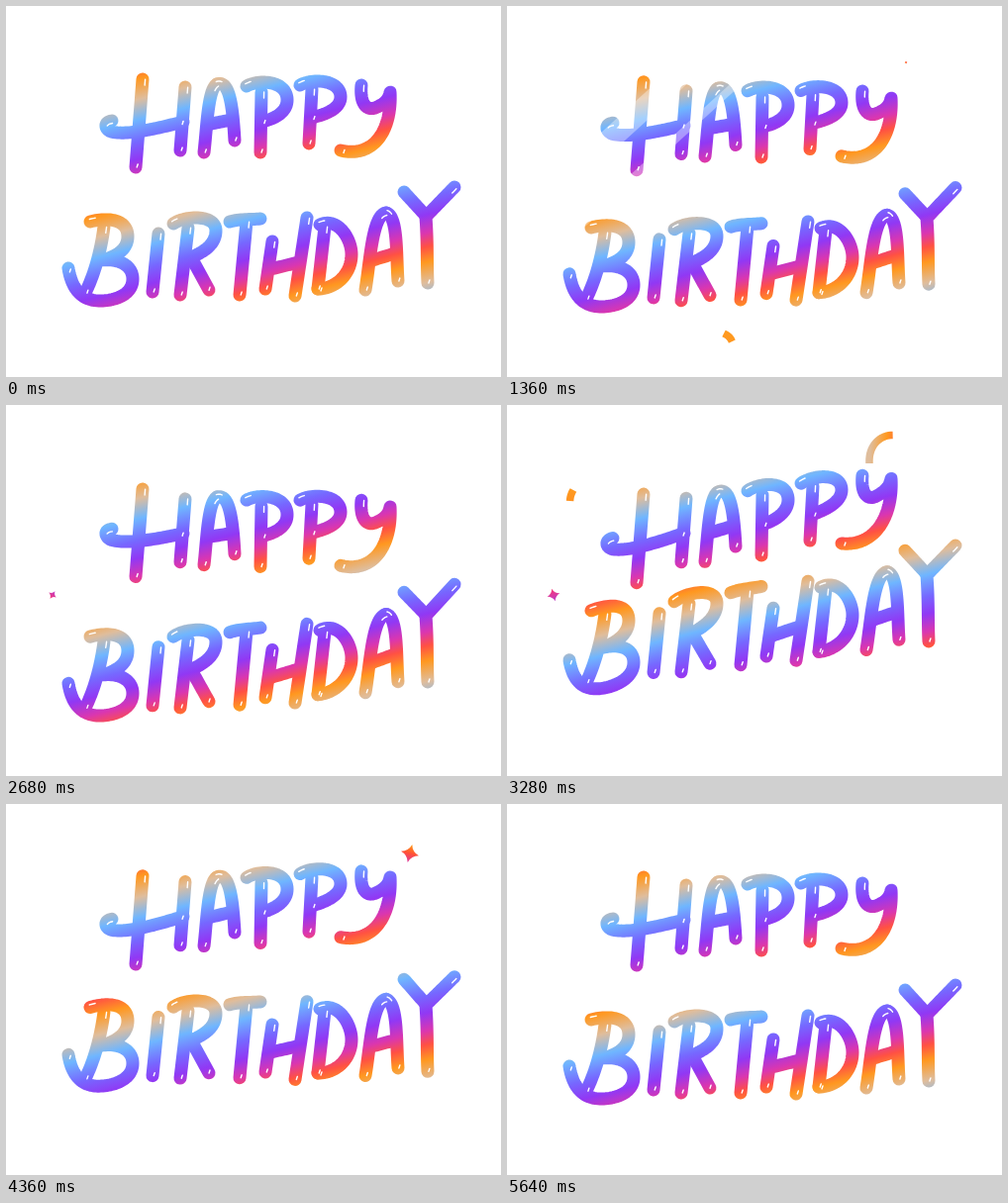
Recreate the animation shown at these times as an HTML page with a canvas. Size 500x375 px, loop 5.68 s.

```html
<!DOCTYPE html>
<html lang="en">
<head>
<meta charset="utf-8">
<title>Happy Birthday</title>
<style>
html, body { margin: 0; width: 100%; height: 100%; overflow: hidden; background: #fff; }
canvas { display: block; width: 500px; height: 375px; }
</style>
</head>
<body>
<canvas width="500" height="375" role="img" aria-label="Happy Birthday"></canvas>
<script>
const LOOP = 5680, STEP = 40, WAVE = 1410, SWING = 21, SKEW = 3, TAU = Math.PI * 2;
const ctx = document.querySelector('canvas').getContext('2d');

// Lettering at time zero: one path per pen stroke.
const happy = [
  'M138 74L131 163', 'M181 82L176 146',
  'M107 116C99 117 99 124 106 127C122 131 152 124 179 117',
  'M213 79C204 84 203 122 200 148', 'M213 79C226 74 229 102 231 136', 'M207 119L228 115',
  'M243 81C255 74 284 75 284 95C284 109 268 115 258 117', 'M258 87L257 148',
  'M297 80C309 73 338 74 338 92C338 104 322 110 308 113', 'M309 84L306 139',
  'M359 80C357 101 366 107 375 102C384 98 387 93 388 87C390 125 372 154 338 146'
];
const birthday = [
  'M85 218C100 214 123 214 123 233C123 248 108 254 97 257C112 255 128 261 128 276C128 292 110 298 95 298C75 298 66 284 63 265',
  'M99 223C96 246 90 270 80 290',
  'M154 230L148 289',
  'M169 220C180 212 212 210 212 227C212 243 196 250 187 254L205 287', 'M184 224L176 292',
  'M226 218C236 215 247 216 257 215', 'M243 218L236 292',
  'M269 238L262 286', 'M304 214L292 293', 'M267 266L296 259',
  'M317 221C335 213 349 235 349 251C349 272 332 286 315 286', 'M322 223L315 286',
  'M384 209C370 211 368 257 363 287', 'M384 209C396 212 394 251 396 278', 'M370 257L393 250',
  'M402 188L424 212', 'M453 183L424 213C426 240 425 259 426 280'
];
const words = [
  { lag: .027, strokes: happy.map(sample) },
  { lag: .183, strokes: birthday.map(sample) }
];

// Stars: place, radius, start, end, colours from left to right.
const pink = ['#bd3ccb', '#f83873'], violet = ['#9a32f0', '#566fff'];
const coral = ['#ff4542', '#ff8527'], warm = ['#ff9a10', '#ff5138', '#dc35a0'];
const stars = [
  [47, 192, 17, 60, 680, pink],
  [70, 172, 17, 540, 1200, pink],
  [403, 57, 15, 1340, 2120, coral],
  [417, 103, 23, 1500, 2200, violet],
  [47, 192, 19, 2640, 3340, pink],
  [421, 103, 23, 3440, 4070, violet],
  [408, 50, 26, 4300, 4980, warm]
];

// Ribbons: path, start, end, colours.
const tan = '#dfbd9c', orange = '#ff9a20', blue = '#78b2ff';
const topArc = 'M366 59C364 22 414 19 413 62';
const ribbons = [
  [topArc, 560, 1120, [tan, orange, '#ff5a3c', '#d936a8']],
  ['M67 86C62 94 63 102 67 110', 560, 1120, [orange, '#ff8a20']],
  ['M207 360C229 358 235 338 219 331', 900, 1460, ['#ff8a20', orange]],
  ['M270 350C290 350 304 337 302 318', 1560, 2120, ['#7b50ff', '#6484ff']],
  [topArc, 3140, 3700, [tan, orange, '#ff5a3c', '#d936a8']],
  ['M67 86C62 94 63 102 67 110', 3140, 3700, [orange, '#ff8a20']],
  ['M207 350C229 348 235 328 219 321', 3640, 4200, [orange, '#ffa43c']],
  ['M305 337C316 340 328 336 335 328', 4480, 5040, ['#527cff', blue]]
].map(([d, ...rest]) => [sample(d), ...rest]);

function sample(d) {
  const path = document.createElementNS('http://www.w3.org/2000/svg', 'path');
  path.setAttribute('d', d);
  const len = path.getTotalLength(), n = Math.ceil(len / 2);
  return Array.from({ length: n + 1 }, (_, i) => {
    const p = path.getPointAtLength(len * i / n);
    return [p.x, p.y];
  });
}

function blend(x0, y0, x1, y1, colours) {
  const g = ctx.createLinearGradient(x0, y0, x1, y1);
  colours.forEach((c, i) => g.addColorStop(i / (colours.length - 1), c));
  return g;
}

// The rainbow stays still while the letters swing through it.
function rainbow() {
  const slope = .25, from = -22, span = 129, turns = 4, k = 1 + slope * slope;
  const at = s => [slope * s / k, s / k];
  const g = ctx.createLinearGradient(...at(from), ...at(from + span * turns));
  const stops = [
    [0, '#ff9820'], [.16, tan], [.32, '#6fb6ff'], [.49, '#7668ff'],
    [.63, '#9138f4'], [.77, '#da36b0'], [.88, '#ff5143'], [.999, '#ff9820']
  ];
  for (let i = 0; i < turns; i++)
    for (const [o, c] of stops) g.addColorStop((i + o) / turns, c);
  return g;
}
const ink = rainbow();

function line(points) {
  ctx.beginPath();
  for (const [x, y] of points) ctx.lineTo(x, y);
  ctx.stroke();
}

// Slightly skewed sine; u counts turns.
const wave = u => -SWING * Math.cos(TAU * u) - SKEW * Math.cos(2 * TAU * (u - .355));

function swing([x, y], lag, t) {
  const q = lag + .00055 * x;
  return [x, y + wave(t / WAVE - q) - wave(-q)];
}

// Short white glint near the start of a stroke and a dot near its end.
function glint(points) {
  const [a, b] = points, len = Math.hypot(b[0] - a[0], b[1] - a[1]);
  const nx = (b[1] - a[1]) / len * 2.6, ny = (a[0] - b[0]) / len * 2.6;
  line(points.slice(0, 4).map(([x, y]) => [x + nx, y + ny]));
  const [x, y] = points[points.length - 2];
  line([[x + 2, y - 1], [x + 1, y + 2]]);
}

function drawText(t) {
  ctx.lineCap = ctx.lineJoin = 'round';
  for (const { lag, strokes } of words) {
    const moved = strokes.map(s => s.map(p => swing(p, lag, t)));
    ctx.strokeStyle = ink;
    ctx.lineWidth = 13;
    moved.forEach(line);
    ctx.strokeStyle = '#fff';
    ctx.lineWidth = 1.4;
    moved.filter(s => s.length > 18).forEach(glint);
  }
}

function drawShine(t) {
  if (t < 1240 || t > 2040) return;
  const c = 612 + (t - 1840) * .75;
  ctx.globalCompositeOperation = 'source-atop';
  ctx.strokeStyle = 'rgba(255,255,255,.36)';
  ctx.lineCap = 'butt';
  for (const [shift, width] of [[0, 22], [66, 8]]) {
    ctx.lineWidth = width;
    line([[c + shift, 0], [c + shift - 412, 375]]);
  }
}

function drawStar([x, y, size, start, end, colours], t) {
  const u = (t - start) / (end - start);
  if (u <= 0 || u >= 1) return;
  const grow = Math.min(1, Math.sin(Math.PI * u) * 1.3), r = size * grow;
  ctx.save();
  ctx.translate(x, y);
  ctx.fillStyle = blend(-r, 0, r, 0, colours);
  ctx.rotate((1 - grow) * (u < .5 ? 1 : -1) * Math.PI * .9);
  ctx.beginPath();
  ctx.moveTo(0, -r);
  for (let i = 1; i <= 4; i++) {
    const a = i * Math.PI / 2, m = a - Math.PI / 4, k = r * .3;
    ctx.quadraticCurveTo(Math.sin(m) * k, -Math.cos(m) * k, Math.sin(a) * r, -Math.cos(a) * r);
  }
  ctx.fill();
  ctx.restore();
}

function drawRibbon([points, start, end, colours], t) {
  const u = (t - start) / (end - start);
  if (u <= 0 || u >= 1) return;
  const n = points.length, ease = v => v * v * (3 - 2 * v);
  const head = Math.ceil(ease(Math.min(1, u * 2)) * n);
  const tail = Math.floor(ease(Math.max(0, u * 2 - 1)) * n);
  if (head - tail < 2) return;
  const first = points[0], last = points[n - 1];
  ctx.strokeStyle = blend(...first, ...last, colours);
  ctx.lineWidth = 7.5;
  ctx.lineCap = 'butt';
  line(points.slice(tail, head));
}

function draw(now) {
  const t = Math.floor(now % LOOP / STEP) * STEP;
  ctx.globalCompositeOperation = 'source-over';
  ctx.clearRect(0, 0, 500, 375);
  drawText(t);
  drawShine(t);
  ctx.globalCompositeOperation = 'destination-over';
  stars.forEach(s => drawStar(s, t));
  ribbons.forEach(r => drawRibbon(r, t));
}

const begin = performance.now();
function tick() {
  draw(performance.now() - begin);
  requestAnimationFrame(tick);
}
tick();
</script>
</body>
</html>
```
